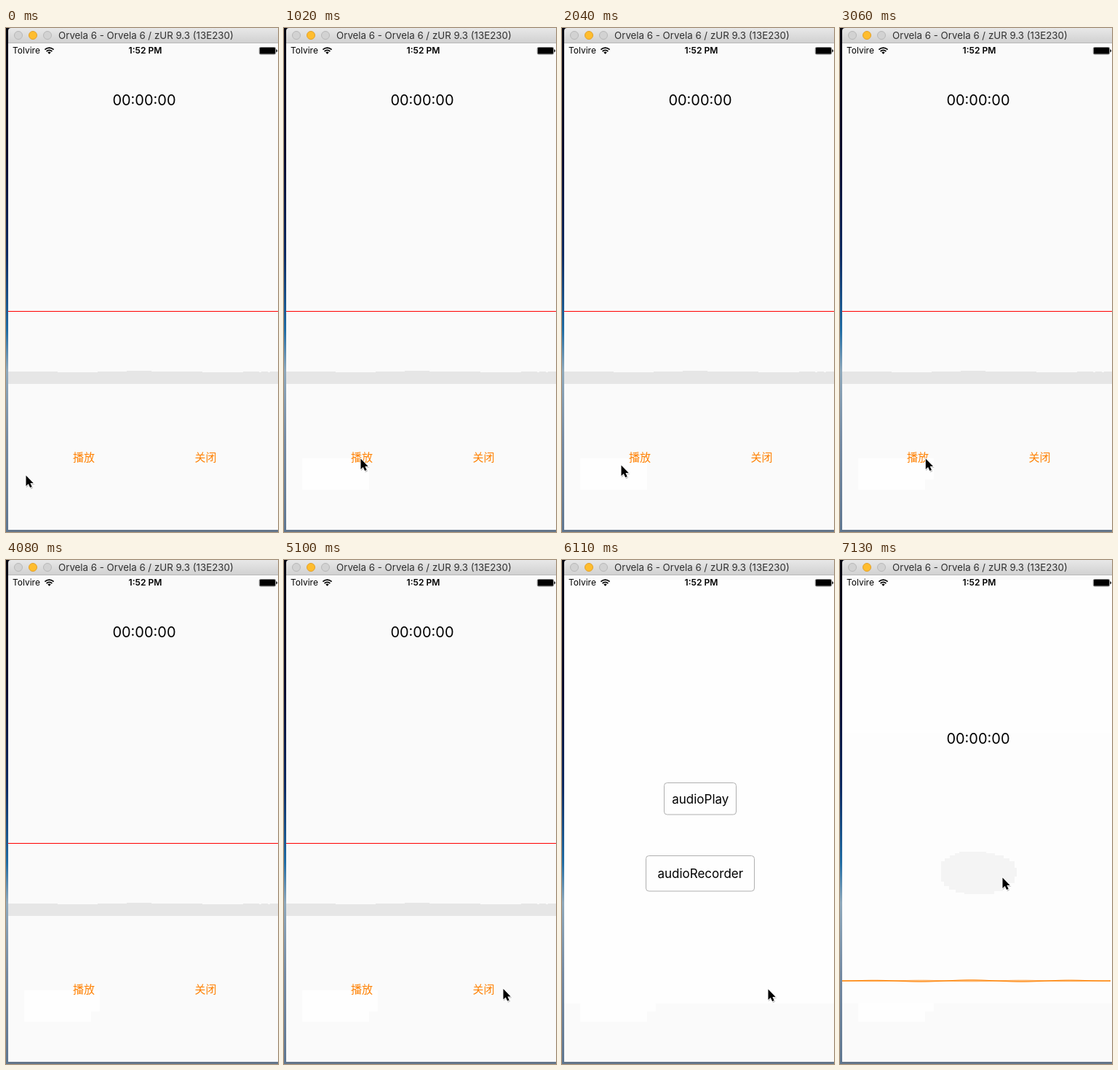
An HTML page for the animation above (8 s loop, 374 px wide and 691 px high).

```html
<!DOCTYPE html>
<html lang="zh">
<head>
<meta charset="utf-8">
<style>
html, body { margin: 0; width: 100%; height: 100%; overflow: hidden; background: #fafafa; }
svg { display: block; width: 100%; height: 100%; }
text { font-family: Inter, Roboto, sans-serif; fill: #000; }
.mid { text-anchor: middle; }
.timer { font-size: 20px; }
.label { font-size: 17px; }
.action { font: 15px "Noto Sans CJK SC", "Noto Sans CJK", sans-serif; fill: #ff8000; }
.box { fill: none; stroke: #b0b0b0; }
</style>
</head>
<body>
<svg viewBox="0 0 374 691">
  <defs>
    <linearGradient id="desk" x2="0" y2="1">
      <stop offset="0" stop-color="#050510"/>
      <stop offset=".25" stop-color="#080a2c"/>
      <stop offset=".45" stop-color="#0d2a62"/>
      <stop offset=".6" stop-color="#206ca4"/>
      <stop offset=".68" stop-color="#8fa9bc"/>
      <stop offset=".82" stop-color="#748aa3"/>
      <stop offset="1" stop-color="#5e7690"/>
    </linearGradient>
    <linearGradient id="bar" x2="0" y2="1">
      <stop offset="0" stop-color="#e8e8e8"/>
      <stop offset="1" stop-color="#d1d1d1"/>
    </linearGradient>
  </defs>

  <rect width="374" height="691" fill="url(#desk)"/>
  <rect x="3" y="688" width="371" height="3" fill="#63758a"/>
  <rect x="3" y="20" width="371" height="668" fill="#fafafa"/>
  <path d="M3 20V4Q3 0 7 0H374V20Z" fill="url(#bar)"/>
  <path d="M3 20.5H374" stroke="#b9b9b9"/>
  <g fill="#d2d2d2" stroke="#b8b8b8">
    <circle cx="17" cy="10" r="5.5"/>
    <circle cx="37" cy="10" r="5.5" fill="#ffbd2e" stroke="#e2a02a"/>
    <circle cx="57" cy="10" r="5.5"/>
  </g>
  <text x="72" y="15" font-size="13.3" style="fill:#303030">Orvela 6 - Orvela 6 / zUR 9.3 (13E230)</text>

  <g id="player">
    <path d="M3 388.5H374" stroke="#f00"/>
    <path d="M3 488V471H71V472H126V471H166V470H200V471H270V472H326V471H348V472H351V471H360V472H363V471H374V488Z" fill="#e6e6e6"/>
  </g>
  <path id="trail" fill="#fefefe"/>
  <g id="actions">
    <text class="action" x="92" y="594">播放</text>
    <text class="action" x="259.5" y="594">关闭</text>
  </g>

  <rect id="page" x="3" y="27" width="371" height="581" fill="#fefefe"/>
  <g id="menu">
    <rect class="box" x="140.5" y="305.5" width="99" height="43.5" rx="4"/>
    <rect class="box" x="115.5" y="405.5" width="149" height="48.5" rx="4"/>
    <text class="label mid" x="190.3" y="334">audioPlay</text>
    <text class="label mid" x="190.3" y="436">audioRecorder</text>
  </g>
  <g id="recorder">
    <rect x="3" y="237" width="371" height="371" fill="#fdfdfd"/>
    <path d="M164 400H201V402H213V405H225V409H233V413H240V422H243V434H240V443H233V449H224V454H212V458H171V456H159V452H150V447H143V441H139V413H144V409H151V405H158V402H164Z" fill="#f4f4f4"/>
    <g id="waves" fill="none" stroke="#ff8000"/>
  </g>
  <text id="timer" class="timer mid" x="190" y="106">00:00:00</text>

  <text x="9" y="35.3" font-size="12">Tolvire</text>
  <g fill="none" stroke="#000" stroke-width="1.7">
    <path d="M53.4 29.7Q59.5 24.4 65.6 29.7M55.6 32Q59.5 28.7 63.4 32"/>
    <path d="M57.3 33.4Q59.5 31.7 61.7 33.4L59.5 35.8Z" fill="#000" stroke="none"/>
  </g>
  <text class="mid" x="191.5" y="35.3" font-size="12.1" font-weight="600">1:52 PM</text>
  <rect x="348.3" y="26.5" width="22.4" height="9.5" rx="1.8" fill="none" stroke="#000" stroke-width=".5"/>
  <rect x="349" y="27" width="21" height="8.5" rx="1"/>
  <path d="M371.4 29V33.4Q373 32.6 373 31.2T371.4 29Z"/>

  <g id="cursor">
    <path d="M0 0V15L3.4 11.9L5.9 17.2L8.6 16L6.2 10.9H10.6Z" transform="translate(.6 1)" stroke="#000" opacity=".22"/>
    <path d="M0 0V14.5L3.3 11.5L5.6 16.6L8.2 15.4L5.9 10.4H10.2Z" stroke="#fff" stroke-width="1.6" paint-order="stroke"/>
  </g>
</svg>
<script>
const LOOP = 8000;
const $ = id => document.getElementById(id);
const show = (id, on) => $(id).setAttribute("display", on ? "inline" : "none");

// Each step: start time, screen, pointer position (none = hidden)
const steps = [
  [0, "player", 27.5, 613.5],
  [1020, "player", 105.5, 590.5],
  [2040, "player", 81.5, 599.5],
  [3060, "player", 117.8, 590.5],
  [4080, "player"],
  [5100, "player", 301.5, 588],
  [6110, "menu", 283.5, 588.5],
  [7130, "recorder", 223.5, 435.5]
];

function wavePath(amp) {
  let d = "";
  for (let x = 3; x <= 374; x += 3) {
    const u = (x - 188.5) / 185.5;
    const y = 577 - amp * (1 - u ** 4) * Math.cos((x - 180) / 140 * 2 * Math.PI);
    d += (d ? "L" : "M") + x + " " + y.toFixed(2);
  }
  return d;
}

$("waves").innerHTML = [1.2, .5, -.3, -.9]
  .map((amp, i) => `<path d="${wavePath(amp)}" stroke-width="${i ? .5 : 1}"/>`).join("");

function trail(t) {
  if (t < 1020) return "";
  return "M25 590H117V633H25Z" + (t < 3060 ? "" : "M117 590H129V619H117Z");
}

function draw(t) {
  const [, screen, x, y] = steps.filter(s => s[0] <= t).pop();
  for (const id of ["player", "menu", "recorder"]) show(id, id === screen);
  show("actions", screen === "player");
  show("page", screen !== "player");
  show("timer", screen !== "menu");
  $("timer").setAttribute("y", screen === "recorder" ? 252 : 106);
  $("trail").setAttribute("d", trail(t));
  show("cursor", x !== undefined);
  if (x !== undefined) $("cursor").setAttribute("transform", `translate(${x} ${y})`);
}

const start = performance.now();
function tick() {
  draw((performance.now() - start) % LOOP);
  requestAnimationFrame(tick);
}
tick();
</script>
</body>
</html>
```
